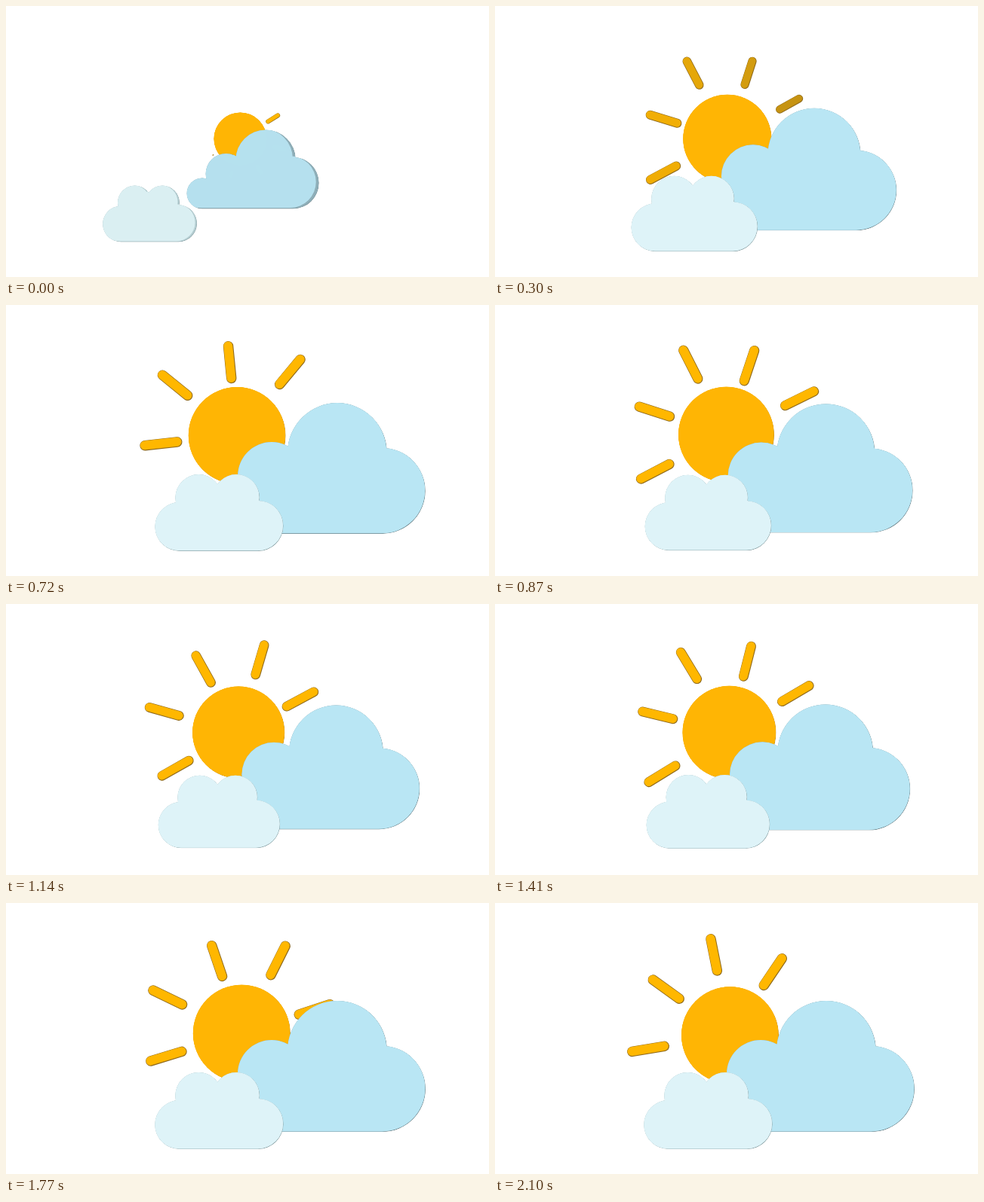
Recreate the animation shown at these times as an HTML page with a canvas. Size 640 px wide and 360 px high, loop 2.13 s.

```html
<!DOCTYPE html>
<html>
<head>
<meta charset="utf-8">
<style>
html, body { margin: 0; overflow: hidden; background: #fff; }
canvas { display: block; }
</style>
</head>
<body>
<canvas id="stage" width="640" height="360"></canvas>
<script>
const ctx = document.getElementById('stage').getContext('2d');
const LOOP = 2130, STEP = 30, RAD = Math.PI / 180;
const clamp = x => Math.min(1, Math.max(0, x));
const easeOut = (x, power = 2) => 1 - (1 - clamp(x)) ** power;
const easeInOut = x => (1 - Math.cos(Math.PI * clamp(x))) / 2;
const mix = (a, b, p) => a + (b - a) * p;

// Circles are [x, y, radius], boxes [x, y, width, height], around the centre.
function shape(circles, boxes) {
  const path = new Path2D();
  for (const [x, y, r] of circles) {
    path.moveTo(x + r, y);
    path.arc(x, y, r, 0, 2 * Math.PI);
  }
  for (const b of boxes) path.rect(...b);
  return path;
}
const bigCloud = shape(
  [[28.5, -21, 66], [88.5, 30, 57], [-58.5, 10, 45], [-111, 53, 34]],
  [[-111, 53, 199.5, 34], [-57.5, 0, 146, 87], [-90, 38, 40, 20]]);
const smallCloud = shape(
  [[-27, -20, 31], [23, -20, 31], [-52.5, 18.5, 32.5], [52, 17.5, 33.5]],
  [[-52.5, 18, 104.5, 33], [-52, -14, 100, 40]]);
const sunDisc = shape([[0, 0, 64.5]], []);
const rayStart = [87.5, 80, 86.5, 80, 84.5, 76.5, 88.5, 83];

// A fill with a thin dark edge and a softer rim at the lower right.
function bevel(path, color, shade, edge, depth = 0) {
  ctx.save();
  ctx.clip(path);
  ctx.fillStyle = edge;
  ctx.fill(path);
  ctx.translate(-0.6, -0.6);
  ctx.fillStyle = shade;
  ctx.fill(path);
  ctx.translate(-depth, -depth * 0.3);
  ctx.fillStyle = color;
  ctx.fill(path);
  ctx.restore();
}

function at(x, y, scale, draw) {
  ctx.save();
  ctx.translate(x, y);
  ctx.scale(scale, scale);
  draw();
  ctx.restore();
}

function line(from, to, width, color, shift) {
  ctx.lineWidth = width;
  ctx.strokeStyle = color;
  ctx.beginPath();
  ctx.moveTo(from[0] + shift, from[1] + shift);
  ctx.lineTo(to[0] + shift, to[1] + shift);
  ctx.stroke();
}

function drawRay(i, t) {
  const order = (i + 7) % 8;
  const grow = easeOut((t + 158 - 38 * order) / 385);
  if (!grow) return;
  const angle = (12.7 + 45.3 * i + 0.16 * t) * RAD;
  const point = d => [d * Math.sin(angle), -d * Math.cos(angle)];
  const from = point(rayStart[i]), to = point(rayStart[i] + 43 * grow);
  const width = 13.5 * Math.sqrt(grow);
  const dark = Math.sin(Math.PI * clamp(t / 660)) * (0.6 + 0.4 * Math.sin(angle));
  ctx.lineCap = 'round';
  line(from, to, width, '#8f6a1c', 0);
  line(from, to, width - 1.6, `hsl(43 ${100 - 18 * dark}% ${50 - 8 * dark}%)`, -0.3);
}

function draw(t) {
  const enter = easeOut(t / 540);
  const enterCloud = easeOut(t / 540, 2.2);
  const breath = 0.058 * (t < 1260 ? easeInOut((t - 660) / 600) : easeInOut((1650 - t) / 390));
  const turn = (68 + 0.16 * t) * RAD;
  const rim = 1 - clamp(t / 240);

  ctx.clearRect(0, 0, 640, 360);
  at(309.3 + 3.1 * Math.cos(turn), 173.6 + 3.1 * Math.sin(turn), mix(0.543, 1, enter) - breath, () => {
    for (let i = 0; i < 8; i++) drawRay(i, t);
    bevel(sunDisc, '#ffb504', '#ffb504', '#a87a1c');
  });

  ctx.globalAlpha = mix(0.91, 1, clamp(t / 90));
  at(mix(327, 410.5, enterCloud), 217, mix(0.603, 1, enterCloud) - breath,
    () => bevel(bigCloud, '#b9e6f4', '#92b4be', '#5d7379', 6 * rim));
  ctx.globalAlpha = 1;

  at(mix(190.5, 282.3, enter), 276, mix(0.733, 1, easeOut(t / 400)) - breath,
    () => bevel(smallCloud, rim > 0.5 ? '#daeff2' : '#def3f8', '#b4cdd1', '#7d9599', 3 * rim));
}

const start = performance.now();
function frame() {
  const t = (performance.now() - start) % LOOP;
  draw(Math.floor(t / STEP) * STEP);
  requestAnimationFrame(frame);
}
frame();
</script>
</body>
</html>
```
